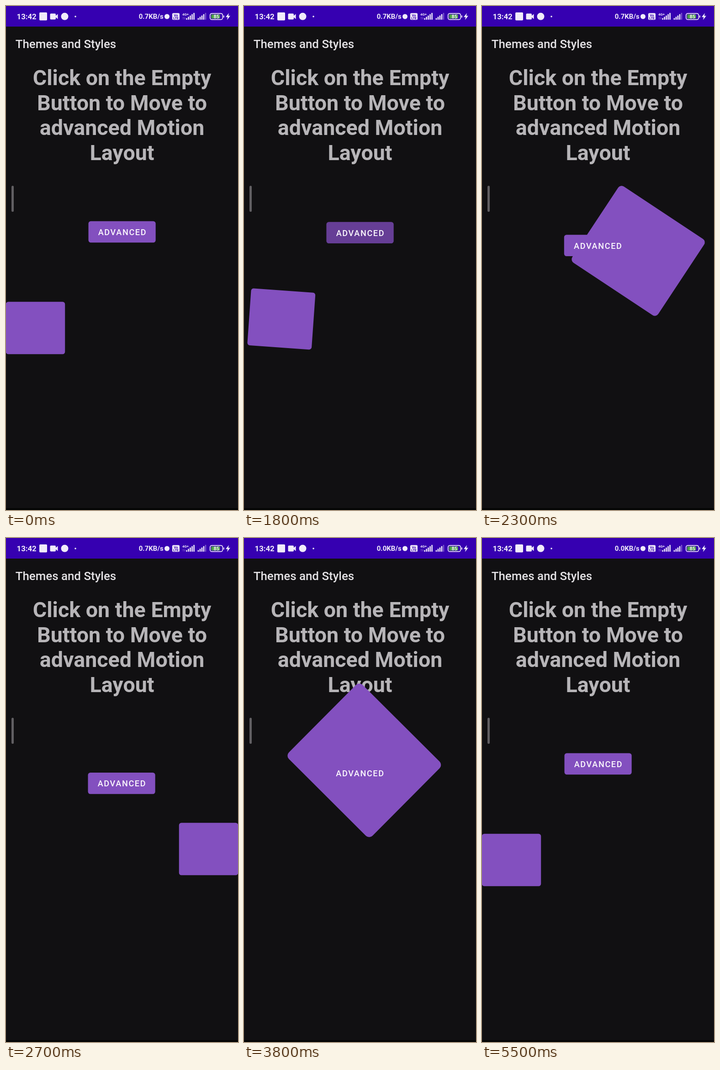
Write an HTML page with a canvas that moves like this. It is 508 px wide and 1102 px high and loops after 5600 ms.

```html
<!DOCTYPE html>
<html lang="en">
<head>
<meta charset="utf-8">
<title>Themes and Styles</title>
<style>
html, body { margin: 0; width: 100%; height: 100%; overflow: hidden; background: #111012; }
canvas { display: block; width: 508px; height: 1102px; }
</style>
</head>
<body>
<canvas id="stage"></canvas>
<script>
const W = 508, H = 1102, LOOP = 5600, STEP = 100;
const FORWARD = 1669, BACK = 3288, DURATION = 1000;
const BAR = '#3600b1', BG = '#111012', PURPLE = '#8350bf', ICON = '#f1ecfa';

const canvas = document.getElementById('stage');
const ctx = canvas.getContext('2d');
const ratio = window.devicePixelRatio || 1;
canvas.width = W * ratio;
canvas.height = H * ratio;

const clamp = v => Math.max(0, Math.min(1, v));
const ease = v => (1 - Math.cos(Math.PI * clamp(v))) / 2;

// Cubic spline through start, middle and end with monotone tangents
function spline(a, m, b, p) {
  const d1 = m - a, d2 = b - m;
  const mid = d1 * d2 > 0 ? (d1 + d2) / 2 : 0;
  const first = p < 0.5;
  const u = first ? p * 2 : p * 2 - 1;
  const [y0, y1, t0, t1] = first ? [a, m, d1, mid] : [m, b, mid, d2];
  const u2 = u * u, u3 = u2 * u;
  return y0 + (y1 - y0) * (3 * u2 - 2 * u3) + t0 * (u3 - 2 * u2 + u) + t1 * (u3 - u2);
}

function box(x, y, w, h, r, color) {
  ctx.beginPath();
  ctx.roundRect(x, y, w, h, r);
  ctx.fillStyle = color;
  ctx.fill();
}

function disc(x, y, r, color) {
  ctx.beginPath();
  ctx.arc(x, y, r, 0, Math.PI * 2);
  ctx.fillStyle = color;
  ctx.fill();
}

function poly(points, color) {
  ctx.beginPath();
  points.forEach(([x, y]) => ctx.lineTo(x, y));
  ctx.closePath();
  ctx.fillStyle = color;
  ctx.fill();
}

function label(str, x, y, size, weight, color, align = 'left', spacing = 0) {
  ctx.font = `${weight} ${size}px Roboto, sans-serif`;
  ctx.letterSpacing = spacing + 'px';
  ctx.textAlign = align;
  ctx.fillStyle = color;
  ctx.fillText(str, x, y);
}

function signal(x, lit) {
  for (let i = 0; i < 5; i++) {
    const h = 3.5 + i * 2.9;
    box(x + i * 4, 30 - h, 2.6, h, 0.8, i < lit ? ICON : '#7c59cc');
  }
}

function statusBar(speed) {
  box(0, 0, W, 45, 0, BAR);
  label('13:42', 23.5, 28.7, 16.8, 700, ICON);
  box(73, 14, 17, 17.5, 2, ICON);
  box(96.5, 16.5, 12.5, 13, 2, ICON);
  poly([[108, 22], [113.5, 17.5], [113.5, 28.5], [108, 24]], ICON);
  disc(128.5, 22.8, 8, ICON);
  disc(152, 23, 1.8, ICON);

  label(speed, 290.7, 28.4, 15, 700, ICON);
  disc(352.5, 23, 5.5, ICON);
  box(364, 15.5, 16, 14.8, 2.5, ICON);
  label('Vo', 372, 22.5, 7.5, 700, BAR, 'center');
  label('LTE', 372, 29, 7, 700, BAR, 'center');
  label('4G+', 386, 20.8, 7.8, 700, ICON);
  poly([[386.5, 26], [388, 24], [389.5, 26], [388.5, 26], [388.5, 29.5], [387.5, 29.5], [387.5, 26]], '#7c59cc');
  poly([[390, 27.5], [391.5, 29.5], [393, 27.5], [392, 27.5], [392, 24], [391, 24], [391, 27.5]], '#7c59cc');
  signal(394.3, 5);
  signal(419.7, 4);

  ctx.beginPath();
  ctx.roundRect(446.8, 16.3, 27.6, 13.4, 4);
  ctx.strokeStyle = ICON;
  ctx.lineWidth = 1.7;
  ctx.stroke();
  box(449.2, 18.6, 19.5, 8.8, 2, '#4b9f45');
  box(476, 20.5, 1.8, 5, 0.8, ICON);
  label('85', 460.7, 27, 11, 700, ICON, 'center');
  poly([[488, 15.5], [481, 24.2], [485.3, 24.2], [484, 30.5], [491, 21.5], [486.8, 21.5]], ICON);
}

function square(p) {
  const grow = spline(0, 1, 0, p);
  ctx.save();
  ctx.translate(spline(64.5, 270.5, 443.5, p), spline(704, 485.5, 680, p));
  ctx.rotate(grow * Math.PI / 4);
  ctx.scale(1 + grow, 1 + grow);
  box(-64.7, -57.3, 129.4, 114.6, 5.2, PURPLE);
  ctx.restore();
}

// Darkening around a tap, measured from the release
const press = dt => clamp((dt + 80) / 120) * (1 - clamp((dt - 150) / 200));

function button(p, t) {
  const x = 180.5 - p, y = 470.5 + 42.5 * p;
  const dark = Math.max(press(t - FORWARD), press(t - BACK));
  box(x, y, 147.2, 46.8, 5.2, PURPLE);
  if (dark > 0) box(x, y, 147.2, 46.8, 5.2, `rgba(17,10,30,${0.25 * dark})`);
  label('ADVANCED', x + 21.2, y + 30.4, 18.1, 500, '#fbf8fd', 'left', 1.62);
}

function draw(t) {
  const p = t < BACK ? ease((t - FORWARD) / DURATION) : 1 - ease((t - BACK) / DURATION);
  ctx.setTransform(ratio, 0, 0, ratio, 0, 0);
  box(0, 0, W, H, 0, BG);
  box(0, 1098, W, 4, 0, '#050505');
  statusBar(t < 2800 ? '0.7KB/s' : '0.0KB/s');
  label('Themes and Styles', 20.7, 92, 25.9, 500, '#e4e2e5');
  ['Click on the Empty', 'Button to Move to', 'advanced Motion', 'Layout'].forEach((line, i) =>
    label(line, 254, 173 + i * 54.6, 46.6, 700, '#b7b5b8', 'center'));
  box(12, 393, 5, 57, 2.5, '#615f62');
  square(p);
  button(p, t);
}

const begin = performance.now();
function tick() {
  const t = (performance.now() - begin) % LOOP;
  draw(Math.floor(t / STEP) * STEP);
  requestAnimationFrame(tick);
}
tick();
</script>
</body>
</html>
```
